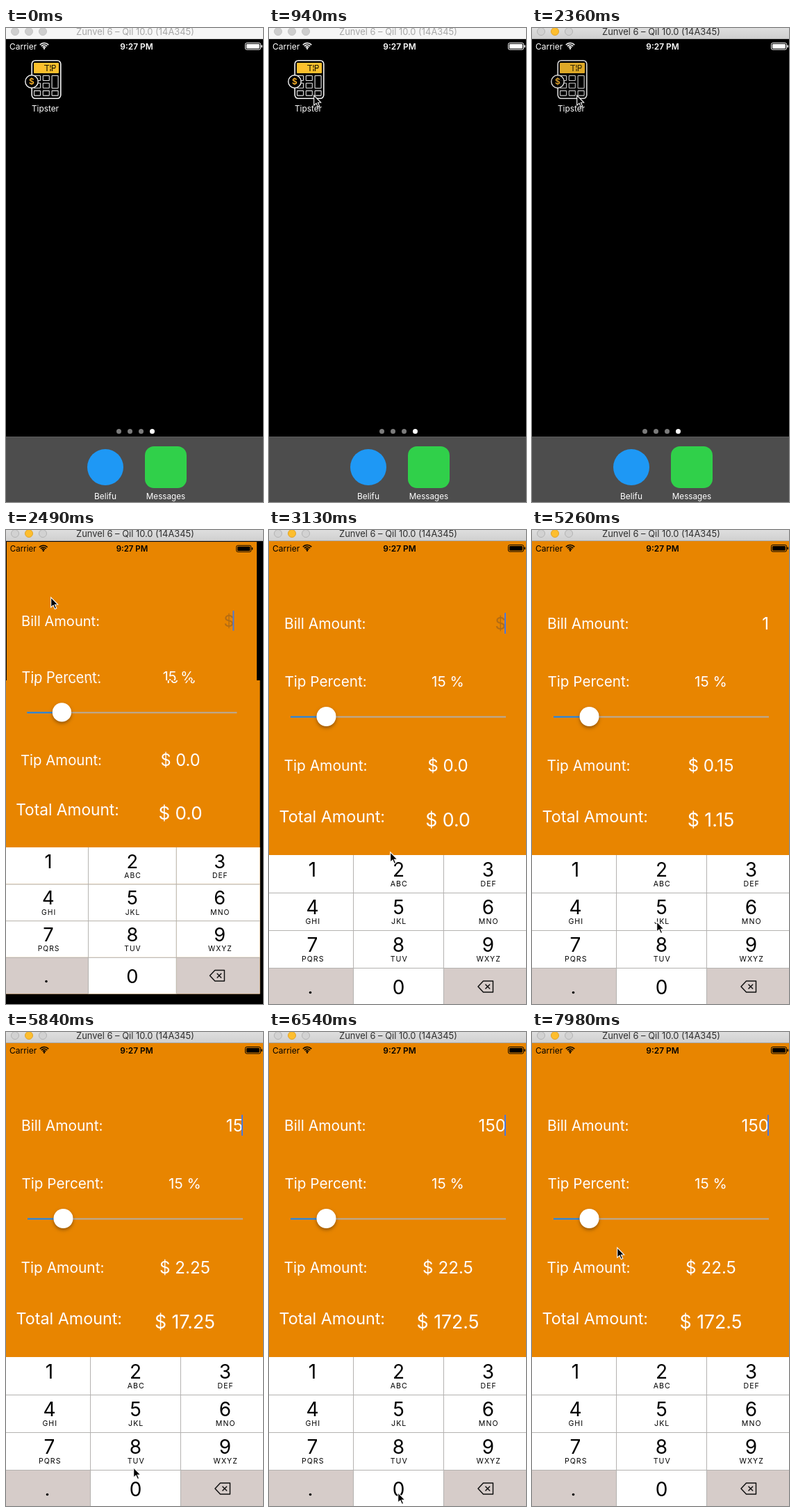
Animation of 370x681 px, one loop 8 s. Source, as an HTML page with a canvas:

```html
<!DOCTYPE html>
<html lang="en">
<head>
<meta charset="utf-8">
<title>Tip calculator</title>
<style>
html, body { margin: 0; width: 100%; height: 100%; overflow: hidden; background: #000; }
canvas { display: block; }
</style>
</head>
<body>
<canvas width="370" height="681"></canvas>
<script>
const ctx = document.querySelector('canvas').getContext('2d');
const LOOP = 8000;
const ORANGE = '#e88500', KEY_GRAY = '#d6ccc9', LINE = '#b4b2b0';

// Pointer positions: [time, x, y], each held until the next
const POINTER = [
  [500, 169, 190], [640, 118, 144], [790, 76, 106], [940, 64, 96],
  [2780, 141, 359], [3130, 174, 462], [3400, 165, 506], [3540, 137, 533],
  [3680, 105, 530], [3830, 84, 514], [3970, 71, 498],
  [4660, 86, 507], [4810, 116, 530], [4960, 148, 550], [5110, 172, 560], [5260, 179, 562],
  [5690, 180, 590], [5830, 183, 625], [5980, 185, 651], [6130, 185, 661],
  [6960, 184, 644], [7100, 175, 598], [7250, 160, 525], [7400, 145, 452],
  [7540, 133, 385], [7690, 125, 338], [7830, 122, 314], [7980, 122, 309]
];
// Key taps: pressed, released, key, bill afterwards
const TAPS = [[4370, 4520, '1', 1], [5400, 5550, '5', 15], [6400, 6540, '0', 150]];
const KEYS = [['1', ''], ['2', 'ABC'], ['3', 'DEF'], ['4', 'GHI'], ['5', 'JKL'], ['6', 'MNO'],
  ['7', 'PQRS'], ['8', 'TUV'], ['9', 'WXYZ'], ['.', ''], ['0', ''], ['del', '']];

// y is the middle of the capitals
function text(s, x, y, size, color = '#fff', align = 'left', weight = 400, spacing = 0) {
  ctx.font = `${weight} ${size}px Inter, "Open Sans", sans-serif`;
  ctx.letterSpacing = spacing + 'px';
  ctx.textAlign = align;
  ctx.fillStyle = color;
  ctx.fillText(s, x, y + size * 0.364);
}

function rect(x, y, w, h, color) {
  ctx.fillStyle = color;
  ctx.fillRect(x, y, w, h);
}

function shape(fill, stroke, width = 1) {
  if (fill) { ctx.fillStyle = fill; ctx.fill(); }
  if (stroke) { ctx.strokeStyle = stroke; ctx.lineWidth = width; ctx.stroke(); }
}

function circle(x, y, r, fill, stroke, width) {
  ctx.beginPath();
  ctx.arc(x, y, r, 0, Math.PI * 2);
  shape(fill, stroke, width);
}

function round(x, y, w, h, r, fill, stroke, width) {
  ctx.beginPath();
  ctx.roundRect(x, y, w, h, r);
  shape(fill, stroke, width);
}

function poly(points, fill, stroke, width) {
  ctx.beginPath();
  points.forEach(([x, y]) => ctx.lineTo(x, y));
  ctx.closePath();
  shape(fill, stroke, width);
}

function titleBar(active) {
  const shade = ctx.createLinearGradient(0, 0, 0, 15);
  shade.addColorStop(0, active ? '#dedede' : '#f6f6f6');
  shade.addColorStop(1, active ? '#d0d0d0' : '#f6f6f6');
  rect(0, 0, 370, 15, shade);
  rect(0, 15, 370, 1, active ? '#aaa' : '#d4d4d4');
  [13, 33, 53].forEach((x, i) => {
    if (!active) circle(x, 5, 5.5, '#cecece', '#c4c4c4');
    else if (i === 1) circle(x, 5, 5.5, '#fdbe2e', '#e0a32a');
    else circle(x, 5, 5.5, '#d2d2d2', '#b3b3b3');
  });
  text('Zunvel 6 – Qil 10.0 (14A345)', 186, 5.5, 12.9, active ? '#2e2e2e' : '#a6a6a6', 'center');
}

function statusBar(color) {
  text('Carrier', 5, 26.5, 12, color);
  text('9:27 PM', 188, 26.5, 11.9, color, 'center', 600);
  for (const r of [3, 5.7, 8.5]) {
    ctx.beginPath();
    ctx.arc(55, 30, r, -Math.PI * 0.76, -Math.PI * 0.24);
    shape(null, color, 1.6);
  }
  circle(55, 29.5, 1.2, color);
  round(344.5, 21.5, 22, 9.5, 2, null, color);
  round(346, 23, 19, 6.5, 1, color);
  rect(367.5, 24.5, 1.5, 3.5, color);
}

function calculatorIcon() {
  round(37.2, 46.7, 41.6, 54.6, 5, '#000', '#f4f4f4', 1.6);
  round(40, 50, 36, 15, 1, '#fcc02d');
  // Segment display letters
  ctx.beginPath();
  [[55, 53.5, 62, 53.5], [59, 53.5, 59, 62], [64, 53, 64, 57], [64, 58.5, 64, 62],
   [66, 53.5, 71, 53.5], [71, 54, 71, 57], [66, 57.7, 71, 57.7], [66.5, 54, 66.5, 62]]
    .forEach(([a, b, c, d]) => { ctx.moveTo(a, b); ctx.lineTo(c, d); });
  shape(null, '#201800', 1.2);
  for (let col = 0; col < 3; col++)
    for (let row = 0; row < 3; row++) {
      if (col === 2 && row === 1) continue;
      const tall = col === 2 && row === 0;
      rect(40 + col * 13, 68 + row * 11, 10, tall ? 19 : 8, '#000');
      round(40.5 + col * 12.8, 68.5 + row * 10.8, 9, tall ? 18 : 7, 0.5, null, '#e4e4e4', 1.1);
    }
  circle(37, 77, 9.2, '#000', '#f4f4f4', 1.4);
  text('$', 37, 77, 12, '#fcb52d', 'center', 600);
}

function home(pressed) {
  rect(0, 16, 370, 665, '#000');
  statusBar('#fff');
  ctx.globalAlpha = pressed ? 0.88 : 1;
  calculatorIcon();
  ctx.globalAlpha = 1;
  text('Tipster', 56.5, 115.8, 11.8, '#fff', 'center');
  [162.5, 178.5, 194.5, 210.5].forEach((x, i) => circle(x, 579.5, 3.5, i < 3 ? '#7c7c7c' : '#fff'));
  rect(0, 587, 370, 94, '#4d4d4d');
  rect(0, 587, 370, 1, '#5c5c5c');
  circle(143, 631, 26, '#1e98f5');
  round(200, 601, 60, 60, 13, '#30d04a');
  text('Belifu', 143, 672.8, 11.9, '#fff', 'center');
  text('Messages', 230, 672.8, 11.7, '#fff', 'center');
}

function keypad(pressed) {
  const left = [0, 122, 252, 375], centers = [62.5, 186.5, 315.5];
  KEYS.forEach(([key, letters], i) => {
    const col = i % 3, row = Math.floor(i / 3), x = centers[col], y = 467 + row * 54;
    const gray = key === '.' || key === 'del' || key === pressed;
    rect(left[col], y, left[col + 1] - left[col], 54, gray ? KEY_GRAY : '#fff');
    if (key === '.') circle(59.5, 664.5, 1.8, '#000');
    else if (key !== 'del') text(key, x, row < 3 ? y + 20.5 : 656.5, 28, '#000', 'center');
    if (letters) text(letters, x + 0.7, y + 41.5, 10.6, '#000', 'center', 400, 1);
  });
  [521, 575, 629].forEach(y => rect(0, y, 375, 1, LINE));
  [121, 251].forEach(x => rect(x, 467, 1, 216, LINE));
  ctx.lineJoin = 'round';
  poly([[301, 656], [308.5, 648], [322.5, 648], [322.5, 664], [308.5, 664]], null, '#111', 1.5);
  ctx.beginPath();
  ctx.moveTo(311.5, 652.7); ctx.lineTo(318.1, 659.3);
  ctx.moveTo(318.1, 652.7); ctx.lineTo(311.5, 659.3);
  shape(null, '#111', 1.5);
}

function slider() {
  rect(31, 267.5, 310, 2, '#b5aca2');
  rect(31, 267.5, 51, 2, '#1c7fdc');
  ctx.save();
  ctx.shadowColor = 'rgba(0,0,0,.35)';
  ctx.shadowBlur = 5;
  ctx.shadowOffsetY = 2.5;
  circle(82.5, 268, 14, '#fff');
  ctx.restore();
}

function app(t) {
  const typed = TAPS.filter(tap => t >= tap[1]).pop();
  const pressed = TAPS.find(tap => t >= tap[0] && t < tap[1]);
  const bill = typed ? typed[3] : 0;
  const money = v => '$ ' + (bill ? +v.toFixed(2) : '0.0');
  rect(0, 16, 375, 667, ORANGE);
  statusBar('#000');
  text('Bill Amount:', 22, 134.5, 20.9);
  text('Tip Percent:', 22.5, 217.5, 20.7);
  text('Tip Amount:', 21.5, 338, 20.9);
  text('Total Amount:', 14.5, 411.5, 23.3);
  text('15 %', 257.5, 217.5, 20.7, '#fff', 'center');
  text(money(bill * 0.15), 257.5, 338, 24.2, '#fff', 'center');
  text(money(bill * 1.15), 257.5, 416, 26.7, '#fff', 'center');
  text(bill || '$', 341, 134.5, 24.2, bill ? '#fff' : '#b36c14', 'right');
  // The caret blink restarts after each digit
  const blinkStart = typed ? typed[1] : 2800;
  if ((t - blinkStart) % 1000 < 600) rect(339, 119, 2, 30, '#4a78dc');
  slider();
  keypad(pressed && pressed[2]);
}

function scaledApp(t, scale, dx, dy, top, bottom) {
  ctx.save();
  ctx.beginPath();
  ctx.rect(0, top, 370, bottom - top);
  ctx.clip();
  ctx.translate(dx, dy);
  ctx.scale(scale, scale);
  app(t);
  ctx.restore();
}

function pointer(t) {
  const spot = POINTER.filter(p => t >= p[0]).pop();
  if (!spot) return;
  ctx.save();
  ctx.translate(spot[1] + 0.7, spot[2] + 0.9);
  ctx.lineJoin = 'miter';
  poly([[0, 0], [0, 14.2], [3.3, 11.2], [5.7, 16.6], [8, 15.6], [5.7, 10.4], [10, 10.2]], '#000', '#fff', 1.1);
  ctx.restore();
}

function draw(t) {
  rect(0, 0, 370, 681, '#000');
  if (t < 2490) home(t >= 2360);
  else if (t < 2630) {
    // The opening zoom is torn between two sizes
    scaledApp(t, 0.96, 1, 1.6, 16, 216);
    scaledApp(t, 0.975, 0, 0.6, 216, 681);
  } else if (t < 2780) scaledApp(t, 0.995, 0, 0.1, 16, 681);
  else app(t);
  titleBar(t >= 1660);
  pointer(t);
}

const start = performance.now();
function tick() {
  draw((performance.now() - start) % LOOP);
  requestAnimationFrame(tick);
}
tick();
</script>
</body>
</html>
```
